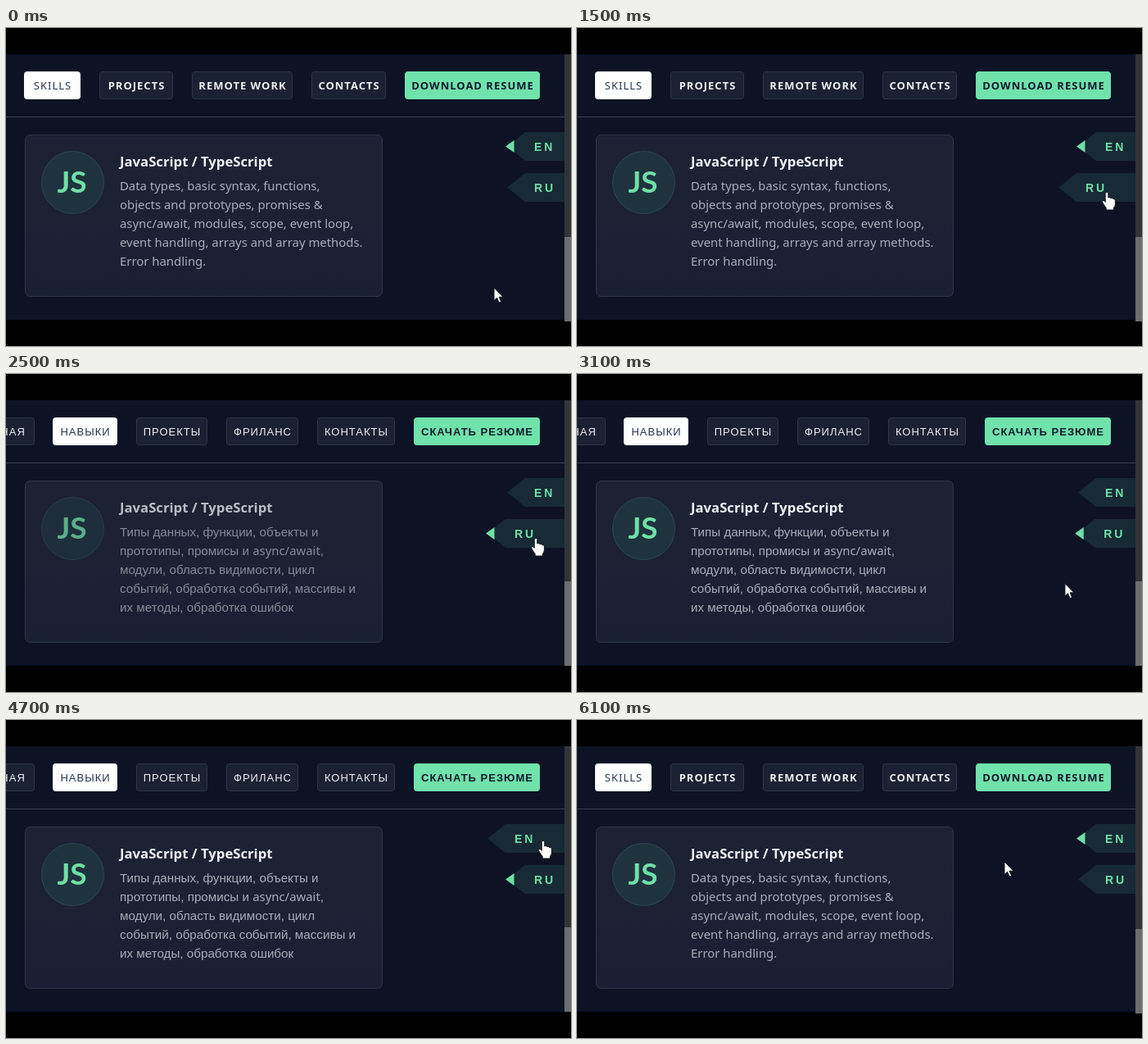
An HTML page that plays this animation: 690 px wide and 388 px high, repeating every 6200 ms.

```html
<!DOCTYPE html>
<html lang="en">
<head>
<meta charset="utf-8">
<style>
  html, body { margin: 0; width: 100%; height: 100%; overflow: hidden; background: #000; }
  svg { display: block; }
  .latin { font-family: "Noto Sans", sans-serif; }
  .cyrillic { font-family: "Liberation Sans", Arial, sans-serif; }
  .nav text { font-size: 13px; letter-spacing: 1px; text-anchor: middle; fill: #eef0f3; }
  .nav.latin text { font-weight: 600; }
  .nav rect { fill: #1a2132; stroke: #2d3746; }
  .nav .current rect { fill: #fff; stroke: #fff; }
  .nav .current text { fill: #263450; font-weight: 400; }
  .nav .resume rect { fill: #70e2ab; stroke: #70e2ab; }
  .nav .resume text { fill: #111a2e; font-weight: 700; }
  .body { fill: #a9adb9; }
  .body.latin { font-size: 14.9px; }
  .body.cyrillic { font-size: 15.2px; }
  .title { font-size: 16.7px; font-weight: 700; fill: #eff0f4; }
  .badge { font: 700 37px Lato, sans-serif; text-anchor: middle; fill: #6fdfa6; }
  .tag text { font: 700 14px "Liberation Sans", Arial, sans-serif; letter-spacing: 3px; fill: #6fdfa6; }
  .cursor { fill: #fff; stroke: #10131c; stroke-linejoin: round; }
</style>
</head>
<body>
<svg width="690" height="388" viewBox="0 0 690 388">
  <defs>
    <clipPath id="page"><rect y="32" width="682" height="324"/></clipPath>
    <linearGradient id="cardFill" x2="0" y2="1">
      <stop stop-color="#1d2134"/><stop offset="1" stop-color="#1a2033"/>
    </linearGradient>
  </defs>
  <rect y="32" width="690" height="324" fill="#0d1325"/>
  <g clip-path="url(#page)">
    <g id="nav"></g>
    <path d="M0 108.5H682" stroke="#3a4153"/>
    <rect x="23.5" y="130.5" width="436" height="197" rx="6" fill="url(#cardFill)" stroke="#2d3745"/>
    <g id="content">
      <circle cx="81.5" cy="188.5" r="38" fill="#1f333f" stroke="#2b4a4d"/>
      <text class="badge" x="80.5" y="201">JS</text>
      <text class="title latin" x="139" y="169">JavaScript / TypeScript</text>
      <g id="texts"></g>
    </g>
    <g id="tags"></g>
  </g>
  <rect x="682" y="32" width="8" height="324" fill="#323438"/>
  <rect id="thumb" x="682" width="8" height="103" fill="#6c6d6f"/>
  <g id="cursor" class="cursor">
    <path id="arrow" d="M0 0V15.5L3.6 12.2L6 18L8.7 16.9L6.2 11.2H11Z"/>
    <path id="hand" d="M-1.8 1.5Q0-1.5 1.8 1.5V7Q3.5 5.8 4.8 7.6Q6.5 6.6 7.6 8.4Q10 7.8 10.4 10.5V15Q10 18 8.6 19V22H-.8V19.5Q-3.5 16-5.4 12.5Q-6.2 9.6-3.6 10.4L-1.8 12.4Z"/>
  </g>
</svg>
<script>
const LOOP = 6200, STEP = 100, FADE = 800, SLIDE = 24;
const TO_RU = 1900, TO_EN = 4900;
const $ = id => document.getElementById(id);

// Each button: label, left edge, right edge.
const languages = [
  {
    font: "latin",
    nav: [["SKILLS", 22, 91], ["PROJECTS", 114, 204], ["REMOTE WORK", 227, 350],
          ["CONTACTS", 373, 464], ["DOWNLOAD RESUME", 487, 652]],
    lines: ["Data types, basic syntax, functions,", "objects and prototypes, promises &amp;",
            "async/await, modules, scope, event loop,",
            "event handling, arrays and array methods.", "Error handling."]
  },
  {
    font: "cyrillic",
    nav: [["ГЛАВНАЯ", -55, 35], ["НАВЫКИ", 57, 136], ["ПРОЕКТЫ", 159, 246],
          ["ФРИЛАНС", 269, 357], ["КОНТАКТЫ", 380, 475], ["СКАЧАТЬ РЕЗЮМЕ", 498, 652]],
    lines: ["Типы данных, функции, объекты и",
            'прототипы, промисы и <tspan class="latin" font-size="14.9">async/await</tspan>,',
            "модули, область видимости, цикл", "событий, обработка событий, массивы и",
            "их методы, обработка ошибок"]
  }
];

function button([label, left, right], index, all) {
  const last = index === all.length - 1;
  const kind = last ? "resume" : index === all.length - 5 ? "current" : "";
  return `<g class="${kind}">
    <rect x="${left + .5}" y="53.5" width="${right - left - 1}" height="33" rx="3"/>
    <text x="${(left + right + 1) / 2}" y="74.5">${label}</text></g>`;
}

const tag = (label, y) => `<g class="tag">
  <path d="M612 ${y}L634 ${y - 17.5}H710V${y + 17.5}H634Z" fill="#172a35"/>
  <path class="marker" d="M610 ${y}l10.5-7.5v15z" fill="#6fdfa6"/>
  <text x="645" y="${y + 5}">${label}</text></g>`;

$("nav").innerHTML = languages.map(l =>
  `<g class="nav ${l.font}">${l.nav.map(button).join("")}</g>`).join("");
$("texts").innerHTML = languages.map(l =>
  `<g class="body ${l.font}">${l.lines.map((s, i) =>
    `<text x="139" y="${198 + 23 * i}">${s}</text>`).join("")}</g>`).join("");
$("tags").innerHTML = tag("EN", 144.5) + tag("RU", 194.5);

// Pointer stops: time, x, y.
const route = [[100, 596, 317], [1250, 647, 200], [2700, 647, 200], [3200, 590, 262],
               [3800, 591, 195], [4400, 656, 147], [5600, 656, 147], [6100, 522, 173]];
// Time the pointer spends over each tag.
const hovers = [[4200, 5800], [1000, 2850]];

const clamp = v => Math.max(0, Math.min(1, v));
const smooth = v => v * v * (3 - 2 * v);
const show = (el, on) => el.style.display = on ? "" : "none";

function pointerAt(t) {
  const next = route.findIndex(stop => stop[0] > t);
  if (next < 1) return (next ? route[route.length - 1] : route[0]).slice(1);
  const a = route[next - 1], b = route[next];
  const p = smooth((t - a[0]) / (b[0] - a[0]));
  return [a[1] + (b[1] - a[1]) * p, a[2] + (b[2] - a[2]) * p];
}

function render(t) {
  const active = t >= TO_RU && t < TO_EN ? 1 : 0;
  [0, 1].forEach(i => {
    show($("nav").children[i], i === active);
    show($("texts").children[i], i === active);
    const el = $("tags").children[i], [enter, leave] = hovers[i];
    const slide = smooth(clamp((t - enter) / 300)) - smooth(clamp((t - leave) / 300));
    el.setAttribute("transform", `translate(${-SLIDE * slide})`);
    show(el.querySelector(".marker"), i === active);
  });

  const changed = t >= TO_EN ? TO_EN : t >= TO_RU ? TO_RU : -FADE;
  $("content").setAttribute("opacity", clamp((t - changed) / FADE));
  $("thumb").setAttribute("y", active ? 253 : 255);

  const over = hovers.some(([enter, leave]) => t >= enter && t < leave);
  show($("hand"), over);
  show($("arrow"), !over);
  $("cursor").setAttribute("transform", `translate(${pointerAt(t)})`);
}

const start = performance.now();
function tick() {
  const t = (performance.now() - start) % LOOP;
  render(Math.floor(t / STEP) * STEP);
  requestAnimationFrame(tick);
}
tick();
</script>
</body>
</html>
```
